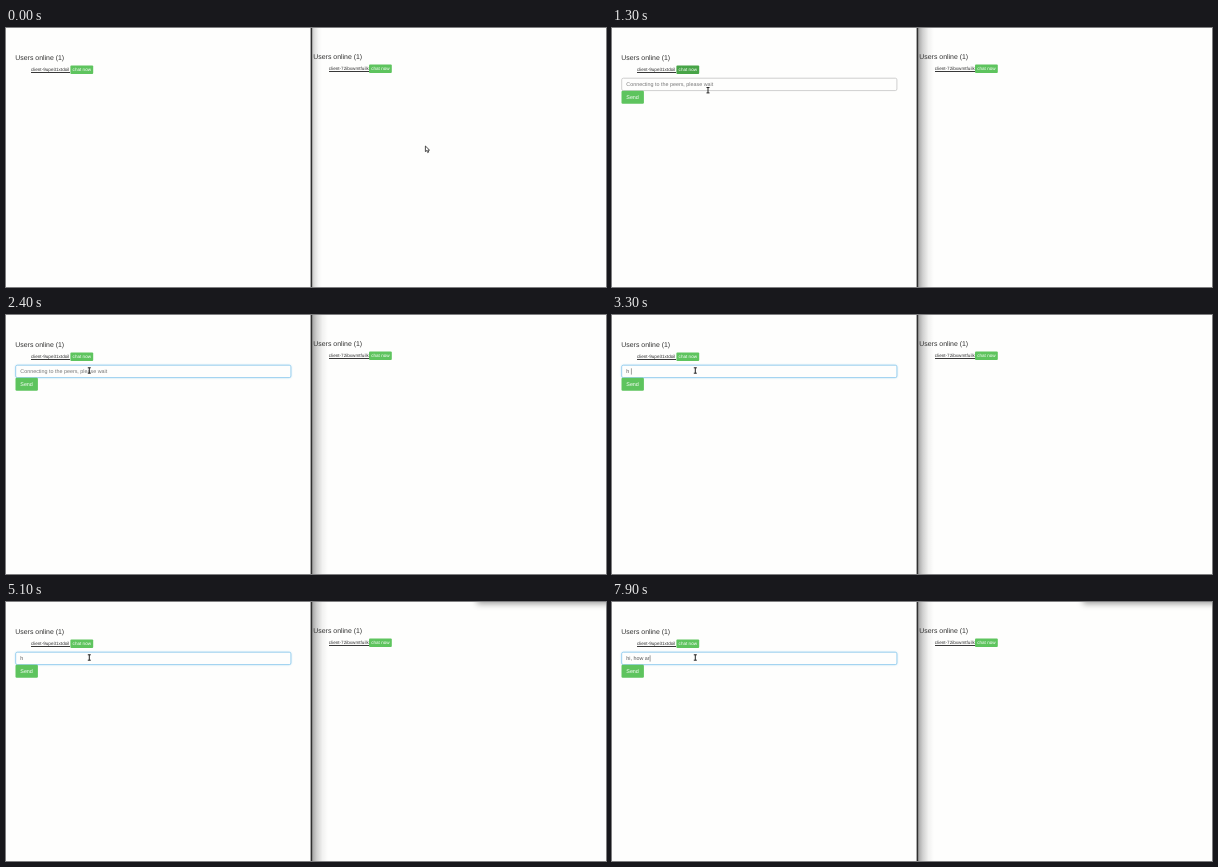
Write an HTML page that moves like this. It is 600 px wide and 259 px high and loops after 8000 ms.

```html
<!DOCTYPE html>
<html lang="en">
<head>
<meta charset="utf-8">
<title>Peer chat</title>
<style>
  html, body { margin: 0; width: 100%; height: 100%; overflow: hidden; background: #fefefd; }
  svg { display: block; width: 600px; height: 259px; }
  text {
    font: 5.39px "Liberation Sans", Arial, sans-serif;
    text-rendering: geometricPrecision; white-space: pre; fill: #555;
  }
  .title { font-size: 6.93px; fill: #333; }
  .small { font-size: 4.62px; fill: #333; }
  .label { fill: #fff; }
  .button { fill: #5ec45e; }
  .cursor { stroke: #222; stroke-width: .8; stroke-linejoin: round; fill: #fff; }
</style>
</head>
<body>
<svg viewBox="0 0 600 259">
  <defs>
    <linearGradient id="edge">
      <stop offset="0" stop-opacity=".36"/>
      <stop offset=".3" stop-opacity=".18"/>
      <stop offset=".65" stop-opacity=".05"/>
      <stop offset="1" stop-opacity="0"/>
    </linearGradient>
    <filter id="blur" x="-20%" y="-100%" width="140%" height="300%">
      <feGaussianBlur stdDeviation="3.2"/>
    </filter>
  </defs>

  <rect id="shade" x="306" width="9" height="259" fill="url(#edge)"/>
  <rect x="304.6" width="1.6" height="259" fill="#303030"/>
  <rect id="popup" x="471" y="-16" width="150" height="17.5" fill-opacity=".42" filter="url(#blur)"/>

  <g>
    <text class="title" x="9.3" y="31.9">Users online (1)</text>
    <text class="small" x="24.9" y="43">client-9upe31xtdoil</text>
    <path d="M25 44.5H64" stroke="#222" stroke-width=".9"/>
    <rect id="chat" class="button" x="64.4" y="37.5" width="22.8" height="8.5" rx="1"/>
    <text class="small label" x="66.6" y="43.4">chat now</text>
  </g>
  <g>
    <text class="title" x="307.3" y="30.6">Users online (1)</text>
    <text class="small" x="322.8" y="41.9">client-72ibxwmtfuilk</text>
    <path d="M323 43.5H363" stroke="#222" stroke-width=".9"/>
    <rect class="button" x="363" y="36.5" width="22.8" height="8.5" rx="1"/>
    <text class="small label" x="365.2" y="42.4">chat now</text>
  </g>

  <g id="form">
    <rect id="glow" x="9.7" y="50.2" width="275.2" height="12.4" rx="1.6" fill="#a9d8f2"
      style="filter: drop-shadow(0 0 .8px #a9d8f2)"/>
    <rect id="field" x="9.7" y="50.2" width="275.2" height="12.4" rx="1.6" fill="#fefefd" stroke-width=".8"/>
    <text id="entry" x="14.3" y="58.3"></text>
    <path id="caret" stroke="#777" stroke-width=".7"/>
    <rect class="button" x="9.5" y="62.8" width="22.4" height="12.9" rx="1.2"/>
    <text class="label" x="14.3" y="71.2">Send</text>
  </g>

  <path id="arrow" class="cursor" d="M.4.4V6L1.7 4.9 2.7 7 3.7 6.5 2.8 4.5H4.5Z"/>
  <path id="hand" class="cursor" d="M2.2.5Q3.2.3 3.2 1.4V2.8L6.3 3.3Q7 3.5 6.8 4.6L6.2 6.9H2.6L.6 4.4Q.8 3.6 2.2 4.4Z"/>
  <path id="beam" fill="none" stroke="#222" stroke-width="1"
    d="M-1.5-2.7H1.5M0-2.7V2.7M-1.5 2.7H1.5"/>
</svg>

<script>
const LOOP = 8000, OPEN = 1300, FOCUS = 1800;
const $ = id => document.getElementById(id);
const show = (id, on) => $(id).style.display = on ? "" : "none";
const set = (id, name, value) => $(id).setAttribute(name, value);

const hint = "Connecting to the peers, please wait";
// [start, text, caret x or 0]
const typing = [
  [0, hint, 0], [1900, hint, 14.4], [2400, hint, 0],
  [3300, "h ", 19.4], [5100, "h ", 0], [6200, "hi", 0],
  [6600, "hi, ", 21.9], [7300, "hi, ho", 27.8],
  [7500, "hi, how ", 33.2], [7900, "hi, how ar", 38.1]
];

function progress(t, from, to) {
  const p = Math.min(1, Math.max(0, (t - from) / (to - from)));
  return p * p * (3 - 2 * p);
}

function move(id, [x0, y0], [x1, y1], p) {
  set(id, "transform", `translate(${x0 + (x1 - x0) * p} ${y0 + (y1 - y0) * p})`);
}

function draw(t) {
  const open = t >= OPEN;
  const focus = progress(t, FOCUS, 2000);

  show("arrow", t < 700);
  show("hand", t >= 700 && !open);
  show("beam", open);
  move("arrow", [419, 117.6], [149.2, 53], progress(t, 0, 400));
  move("hand", [69.6, 42], [69.6, 42], 0);
  move("beam", [96, 62.2], [83.3, 55.5], progress(t, OPEN, 1800));

  show("form", open);
  show("popup", t >= 3700);
  set("shade", "width", open ? 16 : 10);
  set("shade", "opacity", open ? 1 : .6);
  $("chat").style.fill = open ? `color-mix(in srgb, #5ec45e ${focus * 100}%, #47a447)` : "";
  set("glow", "opacity", focus);
  $("field").style.stroke = `color-mix(in srgb, #8ecbee ${focus * 100}%, #c4c4c4)`;

  const [, text, caret] = typing.findLast(step => t >= step[0]);
  $("entry").textContent = text;
  $("entry").style.fill = text === hint ? "#777" : "#555";
  show("caret", caret);
  set("caret", "d", `M${caret} 53.3V59.6`);
}

function tick() {
  // The picture advances in steps of 100 ms.
  draw(Math.floor(performance.now() % LOOP / 100) * 100);
  requestAnimationFrame(tick);
}
tick();
</script>
</body>
</html>
```
